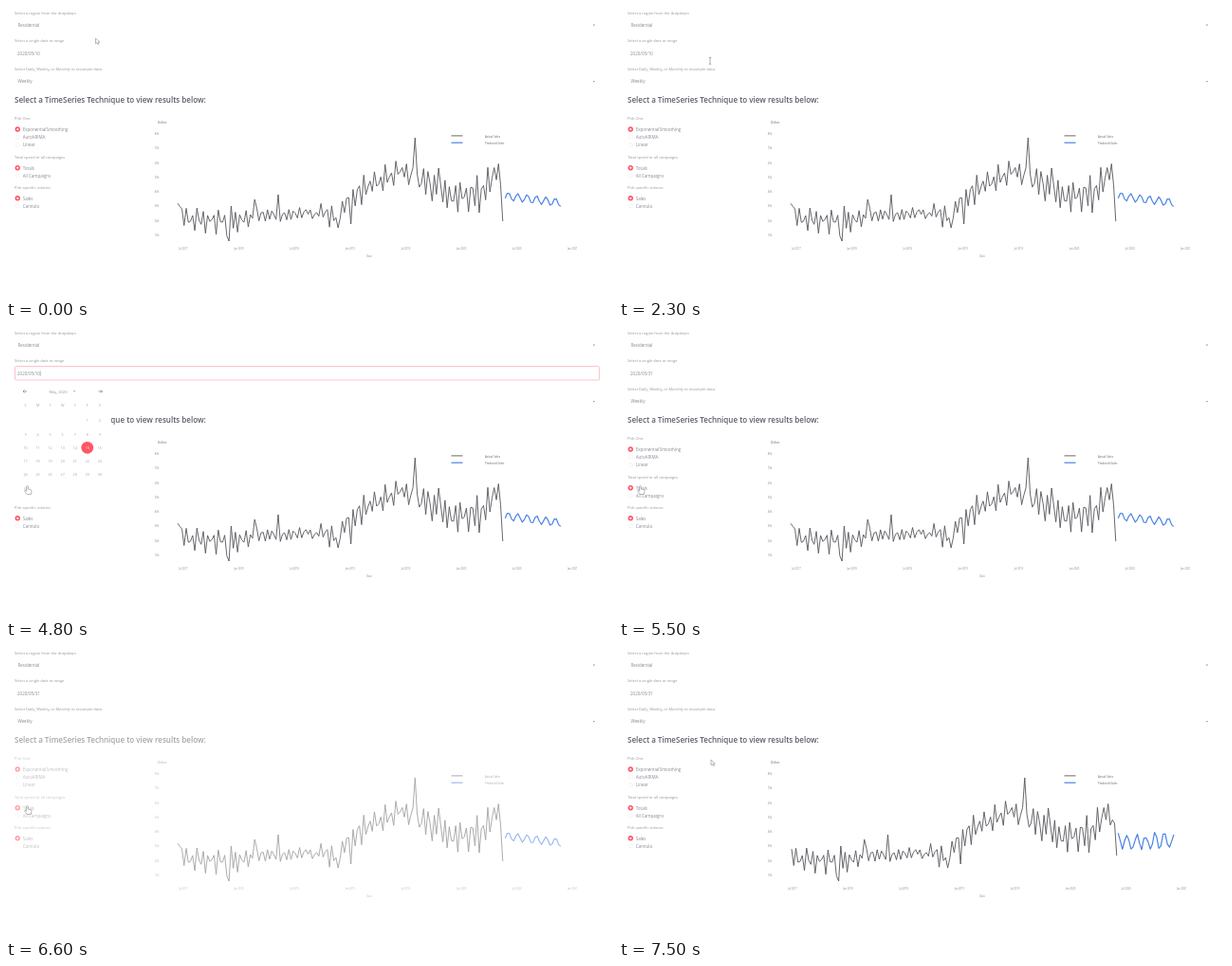
Animation of 640 by 308 pixels, one loop 8 s. Source, as an HTML page:

```html
<!DOCTYPE html>
<html lang="en">
<head>
<meta charset="utf-8">
<title>Forecast dashboard</title>
<style>
  html, body { margin: 0; width: 100%; height: 100%; overflow: hidden; background: #fff; }
  svg { display: block; width: 640px; height: 308px; font-family: "Open Sans", sans-serif; }
  .label { font-size: 4.03px; fill: #94969d; }
  .value { font-size: 4.5px; fill: #888a92; }
  .head { font-size: 8.04px; font-weight: 600; fill: #5a5c66; }
  .tick { font-size: 2.6px; fill: #888; text-anchor: middle; }
  .key { font-size: 2.9px; fill: #666; }
  .day { font-size: 3.7px; fill: #a2a4aa; text-anchor: middle; }
  .line { fill: none; stroke-linejoin: round; }
  .past { stroke: #55565c; stroke-width: .9; }
  .next { stroke: #4a82e6; stroke-width: 1.2; }
  .pointer { fill: #fff; stroke: #888; stroke-width: .6; stroke-linejoin: round; }
</style>
</head>
<body>
<svg id="stage" viewBox="0 0 640 308"></svg>
<script>
const LOOP = 8000, TICK = 100, WEEK = 2.255;
const RED = '#ff5564';
const stage = document.getElementById('stage');

function add(parent, tag, attrs = {}, content = '') {
  const el = document.createElementNS('http://www.w3.org/2000/svg', tag);
  for (const name in attrs) el.setAttribute(name, attrs[name]);
  el.textContent = content;
  parent.appendChild(el);
  return el;
}
const group = parent => add(parent, 'g');
const text = (parent, cls, x, y, str) => add(parent, 'text', { class: cls, x, y }, str);
const path = (parent, d, attrs) => add(parent, 'path', { d, ...attrs });
const show = (el, on) => el.setAttribute('visibility', on ? 'visible' : 'hidden');
const series = (length, fn) => Array.from({ length }, (_, i) => fn(i));

function seeded(seed) {
  return () => {
    seed = (seed * 16807) % 2147483647;
    return seed / 2147483647;
  };
}

function plot(parent, cls, x, values) {
  const points = values.map((y, i) => `${(x + i * WEEK).toFixed(2)},${y.toFixed(1)}`).join(' ');
  add(parent, 'polyline', { class: 'line ' + cls, points });
}

// Sales history: a trend of [week, level, swing], a noisy wave and a few spikes
const trend = [
  [0, 208, 1], [4, 225, 11], [23, 228, 11], [34, 222, 7], [60, 218, 5], [74, 220, 12],
  [82, 202, 13], [92, 187, 10], [106, 175, 11], [116, 186, 16], [140, 203, 17], [150, 174, 8], [154, 199, 12]];
const spikes = { 24: 248, 25: 211, 36: 204, 47: 199, 75: 234, 81: 230, 111: 139 };

function trendAt(week) {
  const i = Math.max(1, trend.findIndex(k => k[0] >= week));
  const a = trend[i - 1], b = trend[i], k = (week - a[0]) / (b[0] - a[0]);
  return [1, 2].map(n => a[n] + (b[n] - a[n]) * k);
}

const rand = seeded(41);
const history = series(155, week => {
  const [level, swing] = trendAt(week);
  const wave = swing * (.5 + rand()) * Math.sin(week * 2.5 + rand());
  return spikes[week] || level + wave;
});
const wave = (i, period) => Math.cos(i * 2 * Math.PI / period);

const charts = [
  { start: 181, tick: 187, past: [...history.slice(0, 152), 227],
    next: series(27, i => 200.5 + i * .27 - 4.3 * wave(i - 1.5, 4.4)) },
  { start: 182, tick: 183, past: [...history.slice(2, 154), 221],
    next: series(27, i => 206 - 7 * wave(i, 4.3) + (rand() - .5) * 7) }
];

// Form
const form = group(stage);
text(form, 'label', 9, 8.6, 'Select a region from the dropdown');
text(form, 'value', 12.5, 22, 'Residential');
text(form, 'label', 9, 37.8, 'Select a single date or range');
text(form, 'label', 9, 67.8, 'Select Daily, Weekly, or Monthly to resample data:');
text(form, 'value', 12.5, 81, 'Weekly');
for (const y of [19.6, 79]) path(form, `M618.7 ${y}h2.4l-1.2 1.6z`, { fill: '#999' });
const date = text(form, 'value', 12, 51.8, '');
const focus = add(form, 'rect',
  { x: 9.5, y: 42.5, width: 616, height: 14.5, rx: 1, fill: 'none', stroke: '#ffbcc3', 'stroke-width': .9 });
const caret = path(form, 'M36.3 47.3v5.6', { stroke: '#888', 'stroke-width': .5 });

// Results
const results = group(stage);
text(results, 'head', 9, 102.4, 'Select a TimeSeries Technique to view results below:');

function radios(title, y, options) {
  text(results, 'label', 9, y, title);
  options.forEach((name, i) => {
    const cy = y + 9.8 + i * 8.2;
    const ring = { cx: 12.2, cy, r: 2.1, fill: '#fff' };
    add(results, 'circle', i ? { ...ring, stroke: '#ececf0', 'stroke-width': .6 }
                             : { ...ring, r: 1.9, stroke: RED, 'stroke-width': 1.6 });
    text(results, 'value', 17.7, cy + 1.8, name);
  });
}
radios('Pick One:', 120.2, ['ExponentialSmoothing', 'AutoARIMA', 'Linear']);
radios('Total spend or all campaigns', 160.9, ['Totals', 'All Campaigns']);
radios('Pick specific column:', 193, ['Sales', 'Cannula']);

text(results, 'key', 160, 124.2, 'Dollars');
for (let i = 0; i < 8; i++) text(results, 'tick', 159, 136 + i * 15.25, `${80 - i * 10}k`);
text(results, 'tick', 383, 265, 'Date');
path(results, 'M469.5 136.9h12', { class: 'past' });
path(results, 'M469.5 144.2h12', { class: 'next' });
text(results, 'key', 505, 139.2, 'Actual Sales');
text(results, 'key', 505, 146.2, 'Predicted Sales');

const views = charts.map(c => {
  const g = group(results);
  plot(g, 'past', c.start, c.past);
  plot(g, 'next', 526.3, c.next);
  for (let i = 0; i < 8; i++)
    text(g, 'tick', c.tick + i * 58.6, 257, `${i % 2 ? 'Jan' : 'Jul'} ${2017 + Math.ceil(i / 2)}`);
  return g;
});

// Calendar
const calendar = group(stage);
add(calendar, 'rect', { x: 8, y: 59, width: 102.5, height: 128, fill: '#fff' });
path(calendar, 'M22 69h-4m1.5-1.5l-1.5 1.5l1.5 1.5M97.5 69h4m-1.5-1.5l1.5 1.5l-1.5 1.5',
  { fill: 'none', stroke: '#777', 'stroke-width': .7 });
text(calendar, 'label', 45.5, 70.6, 'May, 2020');
path(calendar, 'M71 68.3h2.2l-1.1 1.4z', { fill: '#999' });
const column = i => 20.5 + i * 13.05;
[...'SMTWTFS'].forEach((d, i) => text(calendar, 'day', column(i), 85.2, d));
for (let d = 1; d <= 31; d++) {
  const cell = d + 4, x = column(cell % 7), y = 100 + Math.floor(cell / 7) * 14.25;
  if (d === 15) add(calendar, 'circle', { cx: x, cy: y - .2, r: 6.4, fill: RED });
  const day = text(calendar, 'day', x, y + 1.3, d);
  if (d === 15) day.style.fill = '#fff';
}

// Pointers, each drawn with its hot spot at the origin
const cursor = group(stage);
const shapes = {
  arrow: path(cursor, 'M0 0v5.6l1.4-1.1l1 2.1l1.1-.5l-1-2h1.9z', { class: 'pointer' }),
  beam: path(cursor, 'M-1.2-3.4h2.4M0-3.4v6.8M-1.2 3.4h2.4', { class: 'line', stroke: '#777', 'stroke-width': .6 }),
  hand: path(cursor, 'M-.8 .4q.8-1.2 1.6 0v3.1l3 .7q.9.4.7 1.5l-.7 3.3h-4.2l-2.5-3.3q0-1.2 1.2-.7l.9.7z', { class: 'pointer' })
};

const within = (t, from, to) => t >= from && t < to;
const ramp = (t, from, to) => Math.min(1, Math.max(0, (t - from) / (to - from)));

// Cursor glides: from, to, x, y
const glides = [
  [200, 600, 94, 21.3], [1700, 2300, 96, 57.8], [2800, 3200, 86.5, 66.5],
  [3900, 4700, 22.5, 168.5], [6800, 7400, 97, 120]];

function render(t) {
  let x = 94.5, y = 34;
  for (const [from, to, toX, toY] of glides) {
    const k = ramp(t, from, to);
    x += (toX - x) * k;
    y += (toY - y) * k;
  }
  cursor.setAttribute('transform', `translate(${x} ${y})`);
  show(shapes.beam, within(t, 2100, 3000));
  show(shapes.hand, within(t, 4200, 7000));
  show(shapes.arrow, !within(t, 2100, 3000) && !within(t, 4200, 7000));

  date.textContent = t < 5300 ? '2020/05/10' : '2020/05/31';
  show(focus, within(t, 2600, 5500));
  show(caret, within(t, 2600, 5300) && (t - 2600) % 1600 < 800);
  calendar.setAttribute('opacity', ramp(t, 2600, 3000) - ramp(t, 5200, 5500));
  results.setAttribute('opacity', 1 - .52 * (ramp(t, 5900, 6700) - ramp(t, 6900, 7400)));
  views.forEach((v, i) => show(v, i === (t >= 7000 ? 1 : 0)));
}

const began = performance.now();
function loop() {
  const t = (performance.now() - began) % LOOP;
  render(Math.floor(t / TICK) * TICK);
  requestAnimationFrame(loop);
}
loop();
</script>
</body>
</html>
```
